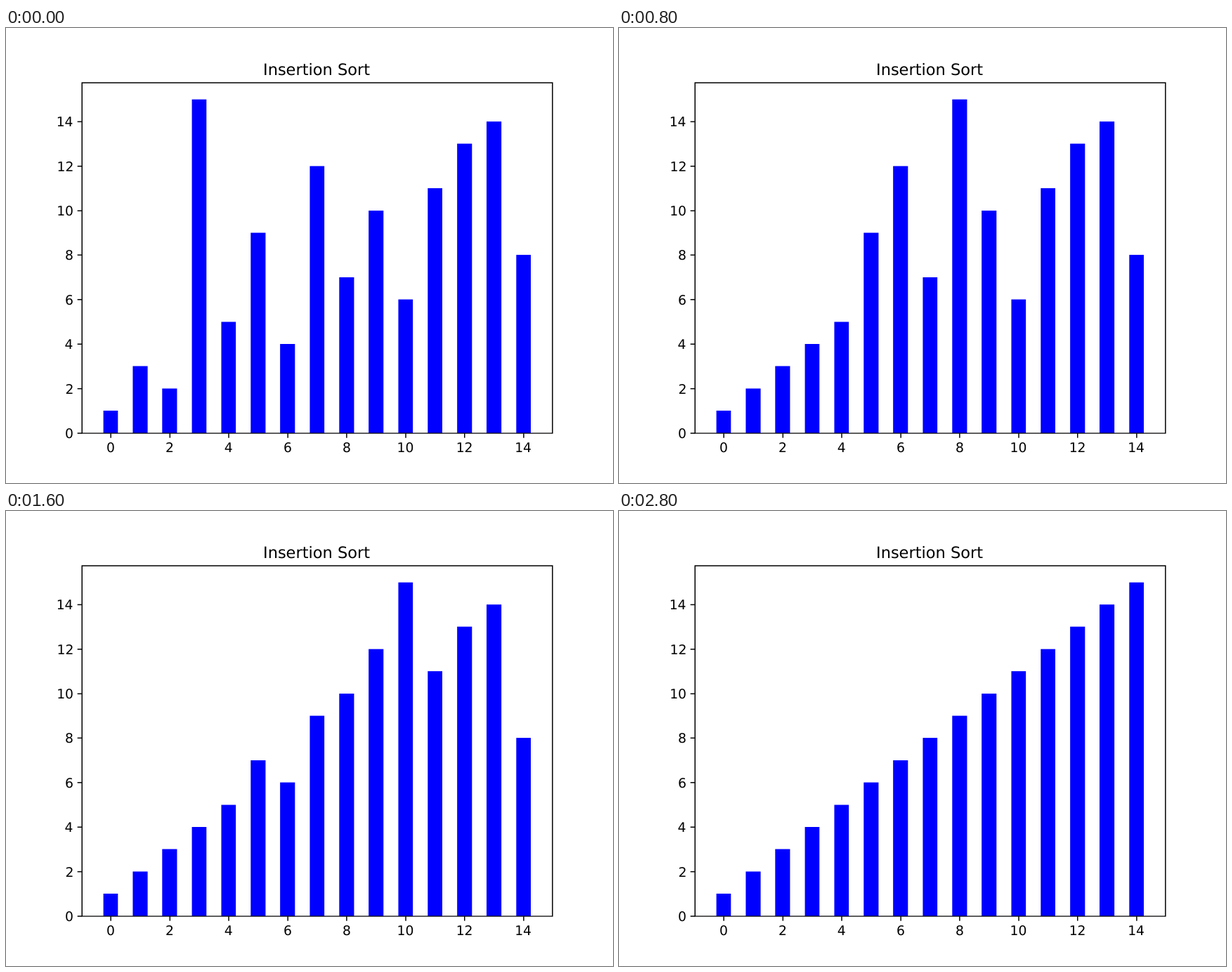
Recreate the animation shown at these times as an HTML page. Size 864 by 648 pixels, loop 2900 ms.

```html
<!DOCTYPE html>
<html lang="en">
<head>
<meta charset="utf-8">
<title>Insertion Sort</title>
<style>
  html, body { margin: 0; width: 100%; height: 100%; overflow: hidden; background: #fff; }
  svg { display: block; width: 100%; height: 100%; }
  text { font-family: "DejaVu Sans", sans-serif; text-rendering: geometricPrecision; }
  .line { fill: none; stroke: #000; stroke-width: 3.333; }
  .bar { fill: #00f; }
</style>
</head>
<body>
<svg id="chart" viewBox="0 0 1920 1440"></svg>
<script>
const VALUES = [1, 3, 2, 15, 5, 9, 4, 12, 7, 10, 6, 11, 13, 14, 8];
const STEP = 100;
const AXES = { left: 240, right: 1728, top: 172.8, bottom: 1281.6 };
const UNIT_X = (AXES.right - AXES.left) / 15.95;
const UNIT_Y = (AXES.bottom - AXES.top) / 15.75;
const TICK = 14.58;
const LABEL_SIZE = 41.667;

const chart = document.getElementById('chart');
const pen = document.createElement('canvas').getContext('2d');

const xAt = i => AXES.left + (i + 0.975) * UNIT_X;
const yAt = v => AXES.bottom - v * UNIT_Y;
const snap = n => Math.round(n) + 0.5;

function add(tag, attrs) {
  const el = document.createElementNS('http://www.w3.org/2000/svg', tag);
  for (const key in attrs) el.setAttribute(key, attrs[key]);
  return chart.appendChild(el);
}

const line = d => add('path', { class: 'line', d });

// Aligns the inked part of the text: align 0.5 centres it on x, 1 ends it at x.
function label(text, x, y, size, align) {
  pen.font = `${size}px "DejaVu Sans", sans-serif`;
  const m = pen.measureText(text);
  const inkLeft = -m.actualBoundingBoxLeft;
  const inkWidth = m.actualBoundingBoxRight - inkLeft;
  add('text', { x: x - inkLeft - inkWidth * align, y, 'font-size': size }).textContent = text;
}

// One state of the array per swap of neighbours.
function sortStates(values) {
  const a = [...values];
  const states = [[...a]];
  for (let i = 1; i < a.length; i++) {
    for (let j = i; j > 0 && a[j - 1] > a[j]; j--) {
      [a[j - 1], a[j]] = [a[j], a[j - 1]];
      states.push([...a]);
    }
  }
  return states;
}

const bars = VALUES.map((_, i) => {
  const x = Math.round(xAt(i - 0.25));
  return add('rect', { class: 'bar', x, width: Math.round(xAt(i + 0.25)) - x });
});

for (let n = 0; n <= 14; n += 2) {
  const x = xAt(n), y = yAt(n);
  line(`M${snap(x)} ${snap(AXES.bottom)}v${TICK}`);
  line(`M${snap(AXES.left)} ${snap(y)}h${-TICK}`);
  label(n, x, AXES.bottom + 2 * TICK + 32, LABEL_SIZE, 0.5);
  label(n, AXES.left - 2 * TICK, y + 16, LABEL_SIZE, 1);
}
line(`M${snap(AXES.left)} ${snap(AXES.top)}H${snap(AXES.right)}V${snap(AXES.bottom)}H${snap(AXES.left)}Z`);
label('Insertion Sort', (AXES.left + AXES.right) / 2, AXES.top - 25, 50, 0.5);

const states = sortStates(VALUES);
const base = Math.round(AXES.bottom);
let shown = -1;

function draw() {
  const now = Math.floor(performance.now() / STEP) % states.length;
  if (now !== shown) {
    shown = now;
    states[now].forEach((v, i) => {
      const y = Math.round(yAt(v));
      bars[i].setAttribute('y', y);
      bars[i].setAttribute('height', base - y);
    });
  }
  requestAnimationFrame(draw);
}
draw();
</script>
</body>
</html>
```
